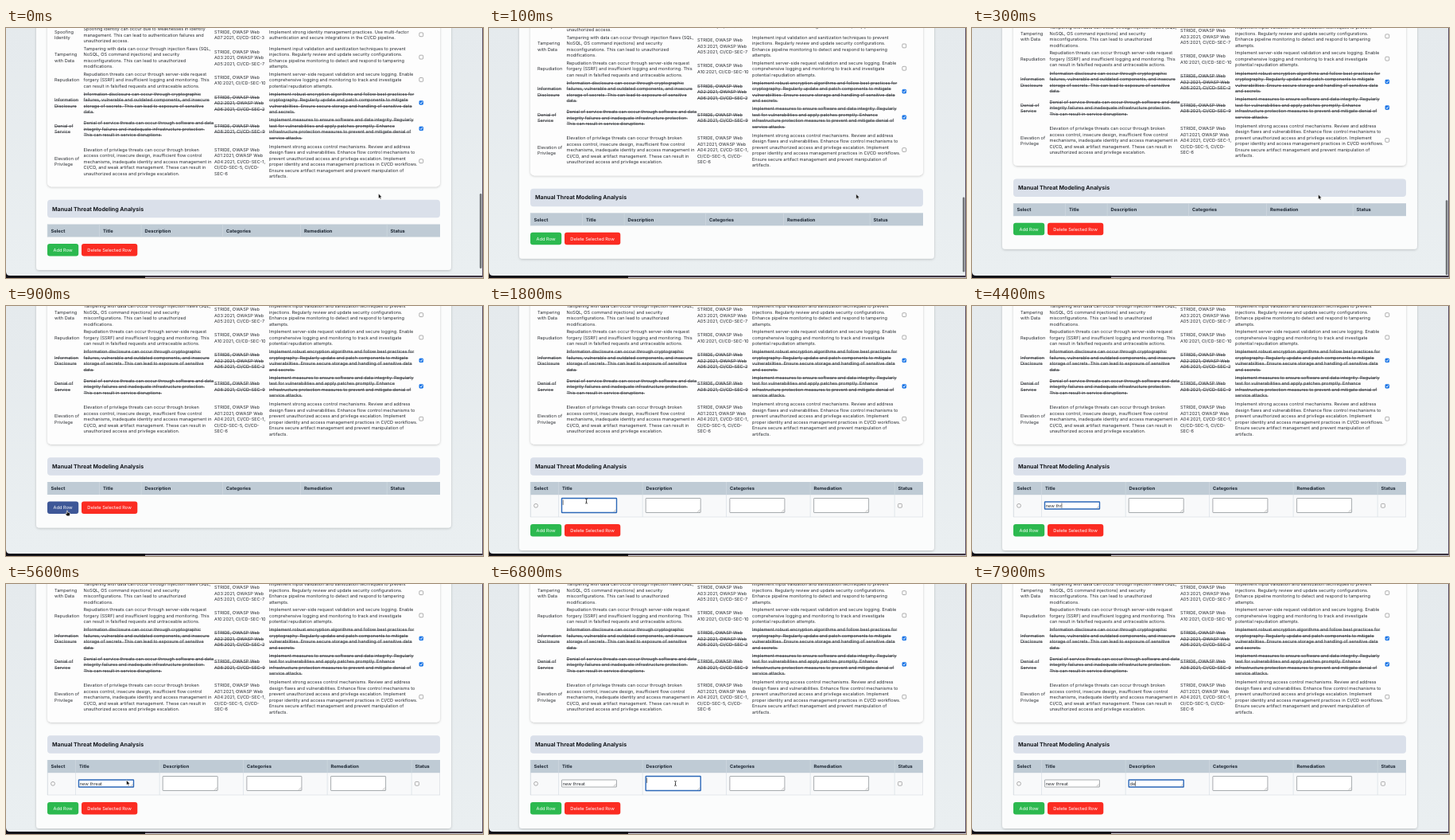
An HTML page for the animation above (8000 ms loop, 600 by 314 pixels).

```html
<!DOCTYPE html>
<html lang="en">
<head>
<meta charset="utf-8">
<title>Manual Threat Modeling Analysis</title>
<style>
html, body { margin: 0; width: 100%; height: 100%; overflow: hidden; background: #121017; }
svg { display: block; width: 600px; height: 314px; }
text { font: 5.6px Inter, "Open Sans", sans-serif; fill: #2b2e33; white-space: pre; text-rendering: geometricPrecision; }
.done { text-decoration: line-through; }
.head { font-weight: 700; font-size: 5.8px; fill: #1d2733; }
.title { font-weight: 700; font-size: 7.05px; fill: #15181d; }
.btn { font-size: 5.7px; fill: #fff; text-anchor: middle; }
</style>
</head>
<body>
<svg viewBox="0 0 600 314">
  <defs>
    <linearGradient id="bg" x2="0" y2="1">
      <stop stop-color="#e5eaed"/><stop offset="1" stop-color="#eaeff1"/>
    </linearGradient>
    <filter id="shadow" x="-5%" y="-5%" width="110%" height="112%">
      <feDropShadow dx="0" dy="1" stdDeviation="1.8" flood-opacity=".2"/>
    </filter>
    <clipPath id="win"><path d="M0 0H599V311H5Q0 311 0 306Z"/></clipPath>
  </defs>
  <path d="M175 311H600V313H175Z" fill="#3a323e"/>
  <path d="M175 313H600V314H175Z" fill="#c6c4c8"/>
  <path d="M599 0H600V313H599Z" fill="#5d5066"/>
  <g clip-path="url(#win)">
    <rect width="600" height="312" fill="url(#bg)"/>
    <g id="page"></g>
    <rect id="thumb" x="595.8" width="2.6" height="94" rx="1.3" fill="#737679"/>
  </g>
  <g id="cursor"></g>
</svg>
<script>
const LOOP = 8000, LINE = 7.5, END = 25.5;
const $ = id => document.getElementById(id);
const clamp = v => Math.max(0, Math.min(1, v));
const ease = v => (v = clamp(v), v * v * (3 - 2 * v));

function add(parent, tag, attrs, label) {
  const el = document.createElementNS('http://www.w3.org/2000/svg', tag);
  for (const k in attrs) el.setAttribute(k, attrs[k]);
  if (label) el.textContent = label;
  return parent.appendChild(el);
}
const set = (el, attrs) => { for (const k in attrs) el.setAttribute(k, attrs[k]); };
const box = (p, x, y, w, h, fill, more) => add(p, 'rect', { x, y, width: w, height: h, fill, ...more });
const text = (p, x, y, s, cls = '') => add(p, 'text', { x, y, class: cls }, s);

function checkbox(p, x, y, on) {
  box(p, x - 2.4, y - 2.4, 4.8, 4.8, on ? '#1673e6' : '#fff',
    { rx: 1, stroke: on ? '#1673e6' : '#777', 'stroke-width': .6 });
  if (on) add(p, 'path', { d: `M${x - 1.4} ${y}l1.1 1.3 1.8 -2.7`, fill: 'none', stroke: '#fff', 'stroke-width': .9 });
}

// Each row: centre y, done, then label | threat | references | remediation
const rows = [
  [8.7, 0, 'Spoofing/Identity',
    'Spoofing identity can occur due to weaknesses in identity|management. This can lead to authentication failures and|unauthorized access.',
    'STRIDE, OWASP Web|A07:2021, CI/CD-SEC-3',
    'Implement strong identity management practices. Use multi-factor|authentication and secure integrations in the CI/CD pipeline.'],
  [37, 0, 'Tampering/with Data',
    'Tampering with data can occur through injection flaws (SQL,|NoSQL, OS command injections) and security|misconfigurations. This can lead to unauthorized|modifications.',
    'STRIDE, OWASP Web|A03:2021, OWASP Web|A05:2021, CI/CD-SEC-7',
    'Implement input validation and sanitization techniques to prevent|injections. Regularly review and update security configurations.|Enhance pipeline monitoring to detect and respond to tampering|attempts.'],
  [65.3, 0, 'Repudiation',
    'Repudiation threats can occur through server-side request|forgery (SSRF) and insufficient logging and monitoring. This|can result in falsified requests and untraceable actions.',
    'STRIDE, OWASP Web|A10:2021, CI/CD-SEC-10',
    'Implement server-side request validation and secure logging. Enable|comprehensive logging and monitoring to track and investigate|potential repudiation attempts.'],
  [94.2, 1, 'Information/Disclosure',
    'Information disclosure can occur through cryptographic|failures, vulnerable and outdated components, and insecure|storage of secrets. This can lead to exposure of sensitive|data.',
    'STRIDE, OWASP Web|A02:2021, OWASP Web|A06:2021, CI/CD-SEC-2',
    'Implement robust encryption algorithms and follow best practices for|cryptography. Regularly update and patch components to mitigate|vulnerabilities. Ensure secure storage and handling of sensitive data|and secrets.'],
  [126.7, 1, 'Denial of/Service',
    'Denial of service threats can occur through software and data|integrity failures and inadequate infrastructure protection.|This can result in service disruptions.',
    'STRIDE, OWASP Web|A08:2021, CI/CD-SEC-9',
    'Implement measures to ensure software and data integrity. Regularly|test for vulnerabilities and apply patches promptly. Enhance|infrastructure protection measures to prevent and mitigate denial of|service attacks.'],
  [167.6, 0, 'Elevation of/Privilege',
    'Elevation of privilege threats can occur through broken|access control, insecure design, insufficient flow control|mechanisms, inadequate identity and access management in|CI/CD, and weak artifact management. These can result in|unauthorized access and privilege escalation.',
    'STRIDE, OWASP Web|A01:2021, OWASP Web|A04:2021, CI/CD-SEC-1,|CI/CD-SEC-5, CI/CD-|SEC-6',
    'Implement strong access control mechanisms. Review and address|design flaws and vulnerabilities. Enhance flow control mechanisms to|prevent unauthorized access and privilege escalation. Implement|proper identity and access management practices in CI/CD workflows.|Ensure secure artifact management and prevent manipulation of|artifacts.']
];
const columns = [61, 97.5, 262, 331];

const page = $('page');
const card = box(page, 38, -40, 522, 344.5, '#fbfcfc', { rx: 4, filter: 'url(#shadow)' });
box(page, 52, -40, 494, 239.3, '#fdfdfd', { rx: 5, filter: 'url(#shadow)' });
for (const [y, done, ...cells] of rows) {
  cells.forEach((cell, i) => {
    const lines = cell.split(i ? '|' : '/');
    lines.forEach((s, n) =>
      text(page, columns[i], y + (n - (lines.length - 1) / 2) * LINE + 2, s, done ? 'done' : ''));
  });
  checkbox(page, 522.3, y - .4, done);
}
box(page, 52, 215.8, 494, 22.5, '#dae0ea', { rx: 4 });
text(page, 58, 229.5, 'Manual Threat Modeling Analysis', 'title');

// Row added by the button
const row = add(page, 'g', {});
box(row, 52.3, 262.5, 493.4, 28, '#f8f9fa', { stroke: '#d5dadf', 'stroke-width': .6 });
add(row, 'circle', { cx: 59, cy: 276.3, r: 2.4, fill: '#fff', stroke: '#777', 'stroke-width': .6 });
checkbox(row, 517, 276.3);

box(page, 52, 246.5, 494, 16, '#bfcbd5');
const heads = ['Select', 'Title', 'Description', 'Categories', 'Remediation', 'Status'].map(s => ({
  label: text(page, 0, 256.7, s, 'head'),
  rule: box(page, 0, 246.5, .6, 16, '#d3dbe2')
}));
const headX = [[56.5, 122, 174.5, 277, 375, 483.5], [56.5, 92, 197.5, 303, 408.5, 514.5]];

const fields = [91.5, 197.2, 302.9, 408.6].map(x => {
  const frame = box(row, x, 0, 69, 18, '#fff', { rx: .5 });
  const grip = add(row, 'path', { fill: 'none', stroke: '#888', 'stroke-width': .5 });
  const value = text(row, x + 1.3, 278.3, '');
  const caret = box(row, 0, 0, .6, 6.4, '#222');
  return { x, frame, grip, value, caret };
});

const buttons = add(page, 'g', {});
const addBtn = box(buttons, 52, 271, 39.2, 15.5, '', { rx: 3 });
text(buttons, 71.6, 280.9, 'Add Row', 'btn');
box(buttons, 95, 271, 70.3, 15.5, '#fb2c22', { rx: 3 });
text(buttons, 130.1, 280.9, 'Delete Selected Row', 'btn');

const cursor = $('cursor');
const shapes = {
  arrow: add(cursor, 'path', { d: 'M0 0V6.2L1.4 4.9 2.4 7.1 3.4 6.6 2.5 4.5H4.4Z', fill: '#111', stroke: '#fff', 'stroke-width': .5 }),
  hand: add(cursor, 'path', { d: 'M-.6 0Q0 -.8 .6 0V2.2L3 2.8Q3.8 3 3.6 4L3 6.8H-.4L-2.4 4Q-2.4 3 -1.3 3.5L-.6 4Z', fill: '#111', stroke: '#fff', 'stroke-width': .6 }),
  beam: add(cursor, 'path', { d: 'M-1.4 -3Q0 -3 0 -2Q0 -3 1.4 -3M0 -2V2M-1.4 3Q0 3 0 2Q0 3 1.4 3M-.7 .9H.7', fill: 'none', stroke: '#111', 'stroke-width': .7 })
};

// Pointer stops: time, x, y
const stops = [[0, 468.5, 208], [200, 455, 209], [300, 435.5, 209], [800, 77, 257], [1200, 77, 257],
  [1600, 122.5, 245], [5300, 122.5, 245], [6200, 234.5, 250.5], [LOOP, 234.5, 250.5]];
function pointer(t) {
  const i = stops.findIndex(s => s[0] > t), [a, x, y] = stops[i - 1], [b, u, v] = stops[i];
  const k = ease((t - a) / (b - a));
  return [x + (u - x) * k, y + (v - y) * k];
}

const ROW_AT = 1100;
const inputs = [
  { word: 'new threat', focus: 1700, blur: 6400, start: 3300, step: 180 },
  { word: 'de', focus: 6400, blur: LOOP, start: 7600, step: 200 }
];

function drawField(f, input, t) {
  const typed = input ? input.word.slice(0, Math.max(0, Math.floor((t - input.start) / input.step) + 1)) : '';
  const focused = input && t >= input.focus && t < input.blur;
  const h = typed ? 9 : 18, y = 276 - h / 2;
  set(f.frame, { y, height: h, stroke: focused ? '#2c68b8' : '#858a8f', 'stroke-width': focused ? 1.4 : .7 });
  set(f.grip, { d: `M${f.x + 65} ${y + h - .7}l3.3 -3.3M${f.x + 67} ${y + h - .7}l1.3 -1.3` });
  f.value.textContent = typed;
  const since = input ? t - (typed ? Math.min(t, input.start + input.step * (input.word.length - 1)) : input.focus) : 0;
  const on = focused && since % 1000 < 500;
  set(f.caret, {
    x: f.x + 1.3 + (typed ? f.value.getComputedTextLength() : 0),
    y: typed ? 272.9 : 269, visibility: on ? 'visible' : 'hidden'
  });
}

function draw(t) {
  const added = t >= ROW_AT;
  const bounce = t < 300 ? 0 : .8 * (1 - ease((t - 300) / 400));
  const scroll = END * (1 - Math.pow(1 - clamp(t / 300), 2)) + bounce;
  set(page, { transform: `translate(0 ${-scroll})` });
  set($('thumb'), { y: 208 + 8 * scroll / END, opacity: 1 - clamp((t - 500) / 300) });

  set(card, { height: added ? 372.5 : 344 });
  set(row, { display: added ? 'inline' : 'none' });
  set(buttons, { transform: `translate(0 ${added ? 28.5 : 0})` });
  heads.forEach(({ label, rule }, i) => {
    const x = headX[+added][i];
    set(label, { x });
    set(rule, { x: x - 4.7, height: added ? 44 : 16 });
  });
  fields.forEach((f, i) => drawField(f, inputs[i], t));

  const hover = ease((t - 650) / 250) * (1 - ease((t - ROW_AT) / 300));
  const mix = [44, 185, 79].map((c, i) => c + ([61, 87, 151][i] - c) * hover);
  set(addBtn, { fill: `rgb(${mix.map(Math.round)})` });

  const [x, y] = pointer(t);
  const inField = (t >= 1500 && t < 5600) || t >= 6000;
  const kind = inField ? 'beam' : t >= 700 && t < 1200 ? 'hand' : 'arrow';
  const hidden = (t >= 3300 && t < 5300) || t >= 7600;
  set(cursor, { transform: `translate(${x} ${y})`, display: hidden ? 'none' : 'inline' });
  for (const k in shapes) set(shapes[k], { display: k === kind ? 'inline' : 'none' });
}

const begin = performance.now();
function tick() {
  const t = (performance.now() - begin) % LOOP;
  draw(Math.floor(t / 100) * 100);
  requestAnimationFrame(tick);
}
tick();
</script>
</body>
</html>
```
